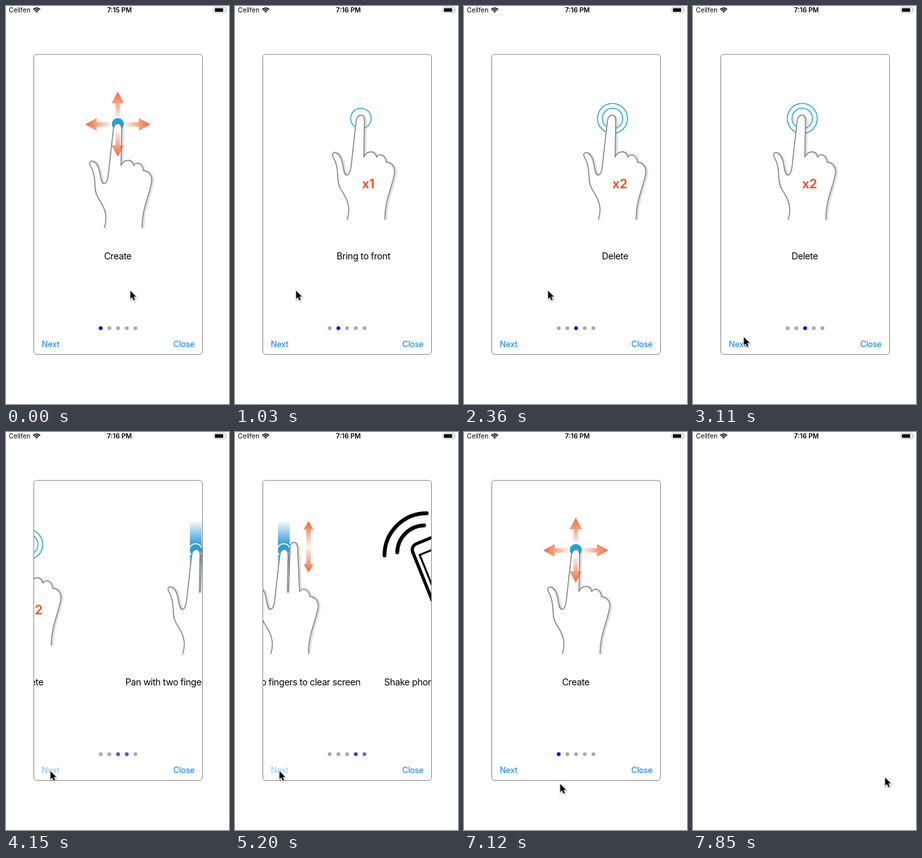
These frames come from a looping animation (349 by 622 pixels, 8 s). An HTML page:

```html
<!DOCTYPE html>
<html lang="en">
<head>
<meta charset="utf-8">
<title>Gesture guide</title>
<style>
html, body { margin: 0; width: 100%; height: 100%; overflow: hidden; background: #fff; }
svg { display: block; width: 100vw; height: 100vh; font-family: Inter, "Liberation Sans", sans-serif; }
.caption { font-size: 14.3px; letter-spacing: -.35px; text-anchor: middle; }
.button { font-size: 12.8px; letter-spacing: -.2px; fill: #007aff; }
.count { font-size: 19.5px; font-weight: 700; fill: #f15a2b; text-anchor: middle; }
.line { fill: none; stroke: #808080; stroke-width: 1.5; stroke-linecap: round; stroke-linejoin: round; }
.ring { fill: none; stroke: #2ea9dc; stroke-width: 1.6; }
.ink { fill: none; stroke: #000; stroke-linecap: round; }
</style>
</head>
<body>
<svg id="stage" viewBox="0 0 349 622"></svg>
<script>
const LOOP = 8000, STEP = 148.1, PAGE = 264, MID = 174.9;

// --- artwork -------------------------------------------------------------
const palm = 'M154 347C161 327 152 312 144 300C137 289 141 277 137 262' +
  'C135 252 130 250 131 245C133 241 141 242 145 254C148 263 148 277 153 278' +
  'C159 278 160 266 161 256L168 193C169 182 181 181 181 192L180 250';
const knuckle = 'C184 240 197 238 200 250';
const finger = 'C180.5 252 182 252 182 248L184 184C184 170 195 170 196 181L199 250';
const side = 'C203 243 214 246 215 258C222 258 229 264 228 274C226 293 212 318 213 347';

const hand = (dx, dy, joint = knuckle, inside = '') => {
  const d = palm + joint + side;
  return `<g transform="translate(${dx} ${dy})">
    <path d="${d}" class="line" transform="translate(2 .5)" filter="url(#soft)" opacity=".6"/>
    <path d="${d}" fill="#fff"/>${inside}<path d="${d}" class="line"/></g>`;
};
const arrow = angle =>
  `<path d="M0-51l10 18h-6.5v21h-7v-21h-6.5z" fill="url(#fade)" transform="translate(175 185) rotate(${angle})"/>`;
const ring = r => `<circle cx="171" cy="175.7" r="${r}" class="ring"/>`;
const count = s => `<text x="182.5" y="284.5" class="count">${s}</text>`;
const waves = '<path d="M-112-45A66 66 0 0 1-46-111M-92-50A43 43 0 0 1-50-92" class="ink" stroke-width="6"/>';

const pages = [
  ['Create', arrow(0) + arrow(90) + arrow(-90) +
    '<circle cx="175" cy="184.5" r="9.4" fill="#22a2de"/>' + hand(0, -.5, knuckle, arrow(180))],
  ['Bring to front', ring(16) + hand(-4.5, -13.7) + count('x1')],
  ['Delete', ring(16) + ring(23.5) + hand(-5, -13.7) + count('x2')],
  ['Pan with two fingers to clear screen',
    `<rect x="160.8" y="138" width="18.5" height="88" fill="url(#trail)"/>
    <circle cx="169.8" cy="184.5" r="10" fill="#22a2de" stroke="#fff" stroke-width="1.6"/>
    <path d="M0-40l8 13h-4.5v54h4.5l-8 13-8-13h4.5v-54h-4.5z" fill="url(#both)" transform="translate(208.6 179.5)"/>` +
    hand(-4.4, -.7, finger)],
  ['Shake phone to restore the shapes',
    `<g transform="translate(175.5 238)">${waves}<g transform="rotate(180)">${waves}</g>
    <g transform="rotate(-22)" class="ink">
      <rect x="-44" y="-82" width="88" height="164" rx="10" stroke-width="5"/>
      <rect x="-35.5" y="-64" width="71" height="128" stroke-width="3"/>
      <path d="M-9-73h18" stroke-width="3"/><circle cy="73" r="4.5" stroke-width="2.5"/>
    </g></g>`]
];

const gradient = (id, y1, y2, stops) =>
  `<linearGradient id="${id}" gradientUnits="userSpaceOnUse" x1="0" x2="0" y1="${y1}" y2="${y2}">` +
  stops.map(([at, color, alpha = 1]) =>
    `<stop offset="${at}" stop-color="${color}" stop-opacity="${alpha}"/>`).join('') + '</linearGradient>';
const arc = r => `M${48 - .743 * r} ${10.4 - .669 * r}A${r} ${r} 0 0 1 ${48 + .743 * r} ${10.4 - .669 * r}`;
const arrowhead = 'M0 0V14.2L3.2 11.2L5.6 16.8L8 15.8L5.7 10.3H10.2Z';

document.getElementById('stage').innerHTML = `
<defs>
  ${gradient('fade', -51, -12, [[0, '#f26b3a'], [.45, '#f7a283'], [1, '#fdeee7']])}
  ${gradient('both', -40, 40, [[0, '#f2662f'], [.5, '#fff4ef'], [1, '#f2662f']])}
  ${gradient('trail', 138, 226, [[0, '#2a95d5', 0], [.45, '#2a95d5'], [.55, '#2a95d5'], [1, '#2a95d5', 0]])}
  <filter id="soft" x="-20%" y="-20%" width="140%" height="140%"><feGaussianBlur stdDeviation="1.2"/></filter>
  <clipPath id="frame"><rect x="43.5" y="75.7" width="264" height="468.8" rx="4.5"/></clipPath>
</defs>
<rect width="349" height="622" fill="#fff"/>
<text x="4.5" y="10.2" font-size="10.2">Cellfen</text>
<path d="${arc(7.3)}${arc(4.5)}" fill="none" stroke="#000" stroke-width="1.8"/>
<path d="${arc(2.5)}L48 10.4z"/>
<text id="clock" x="177.5" y="10.2" font-size="10.4" font-weight="600" text-anchor="middle"></text>
<rect x="325.5" y="2" width="18.5" height="8.4" rx="2" fill="none" stroke="#a6a6a6" stroke-width=".9"/>
<rect x="327" y="3.4" width="13" height="5.6" rx=".8"/>
<path d="M345.2 4.6q1.4 1.6 0 3.2z" fill="#a6a6a6"/>
<g id="card">
  <g clip-path="url(#frame)"><g id="strip">${pages.map(([name, art], i) =>
    `<g transform="translate(${i * PAGE} 0)">${art}<text x="${MID}" y="396" class="caption">${name}</text></g>`).join('')}
  </g></g>
  ${pages.map((_, i) => `<circle class="dot" cx="${148.2 + i * 13.6}" cy="503.6" r="3"/>`).join('')}
  <text id="next" x="56" y="532.6" class="button">Next</text>
  <text x="261.8" y="532.6" class="button">Close</text>
  <rect x="43.5" y="75.7" width="264" height="468.8" rx="4.5" fill="none" stroke="#868686"/>
</g>
<g id="cursor"><g transform="translate(.6 .9) scale(.9)">
  <path d="${arrowhead}" transform="translate(.6 1.4)" fill="none"
    stroke="#000" stroke-width="2" opacity=".3" filter="url(#soft)"/>
  <path d="${arrowhead}" stroke="#fff" stroke-width="1.6" paint-order="stroke"/>
</g></g>`;

// --- motion --------------------------------------------------------------
const drag = [[400, 0], [740, 99], [1037, 238], [1130, 264], [1190, 264], [1380, 382],
  [1481, 472], [1630, 522], [1700, 528], [1790, 528], [2370, 466.5], [2600, 528]];
const mouse = [[400, 194, 444], [740, 95, 444], [1037, 95, 444], [1185, 185, 444], [1380, 67, 444],
  [1790, 69, 444], [2370, 131, 444], [2666, 109, 479], [3258, 69, 529], [6900, 69, 529],
  [7109, 150, 549], [7257, 255, 540], [7405, 268, 530], [7553, 263, 534], [7701, 263, 534], [7849, 300, 539]];
const taps = [[3993, 3], [5063, 4], [5940, 0]];
const turns = [[740, 1], [1320, 2], ...taps];

const clamp = x => Math.min(1, Math.max(0, x));
const ease = x => (x = clamp(x), x * x * (3 - 2 * x));
const mix = (a, b, p) => a + (b - a) * p;

function track(keys, t) {
  const i = keys.findIndex(k => k[0] > t);
  if (i === 0) return keys[0].slice(1);
  if (i < 0) return keys[keys.length - 1].slice(1);
  const a = keys[i - 1], b = keys[i], p = (t - a[0]) / (b[0] - a[0]);
  return a.slice(1).map((v, k) => mix(v, b[k + 1], p));
}

const $ = id => document.getElementById(id);
const [clock, card, strip, next, cursor] = ['clock', 'card', 'strip', 'next', 'cursor'].map($);
const dots = [...document.querySelectorAll('.dot')];

function draw(time) {
  const t = Math.floor((time % LOOP + 9.9) / STEP) * STEP;
  clock.textContent = t < STEP ? '7:15 PM' : '7:16 PM';

  let [scroll] = track(drag, t), glow = 1;
  for (const [at, page] of taps) if (t >= at) {
    scroll = mix(scroll, page * PAGE, ease((t - at) / 300));
    glow = mix(.2, 1, clamp((t - at) / 430));
  }
  strip.setAttribute('transform', `translate(${-scroll} 0)`);
  next.setAttribute('opacity', glow);

  let lit = [1, 0, 0, 0, 0];
  for (const [at, page] of turns) {
    const p = ease((t - at) / 300);
    lit = lit.map((v, i) => mix(v, i === page ? 1 : 0, p));
  }
  dots.forEach((dot, i) => {
    const grey = mix(170, 0, lit[i]);
    dot.setAttribute('fill', `rgb(${grey},${grey},${mix(170, 245, lit[i])})`);
  });

  card.setAttribute('opacity', 1 - clamp((t - 7320) / 210));
  cursor.setAttribute('transform', `translate(${track(mouse, t).join(' ')})`);
}

let start;
function tick(now) {
  start ??= now;
  draw(now - start);
  requestAnimationFrame(tick);
}
draw(0);
requestAnimationFrame(tick);
</script>
</body>
</html>
```
